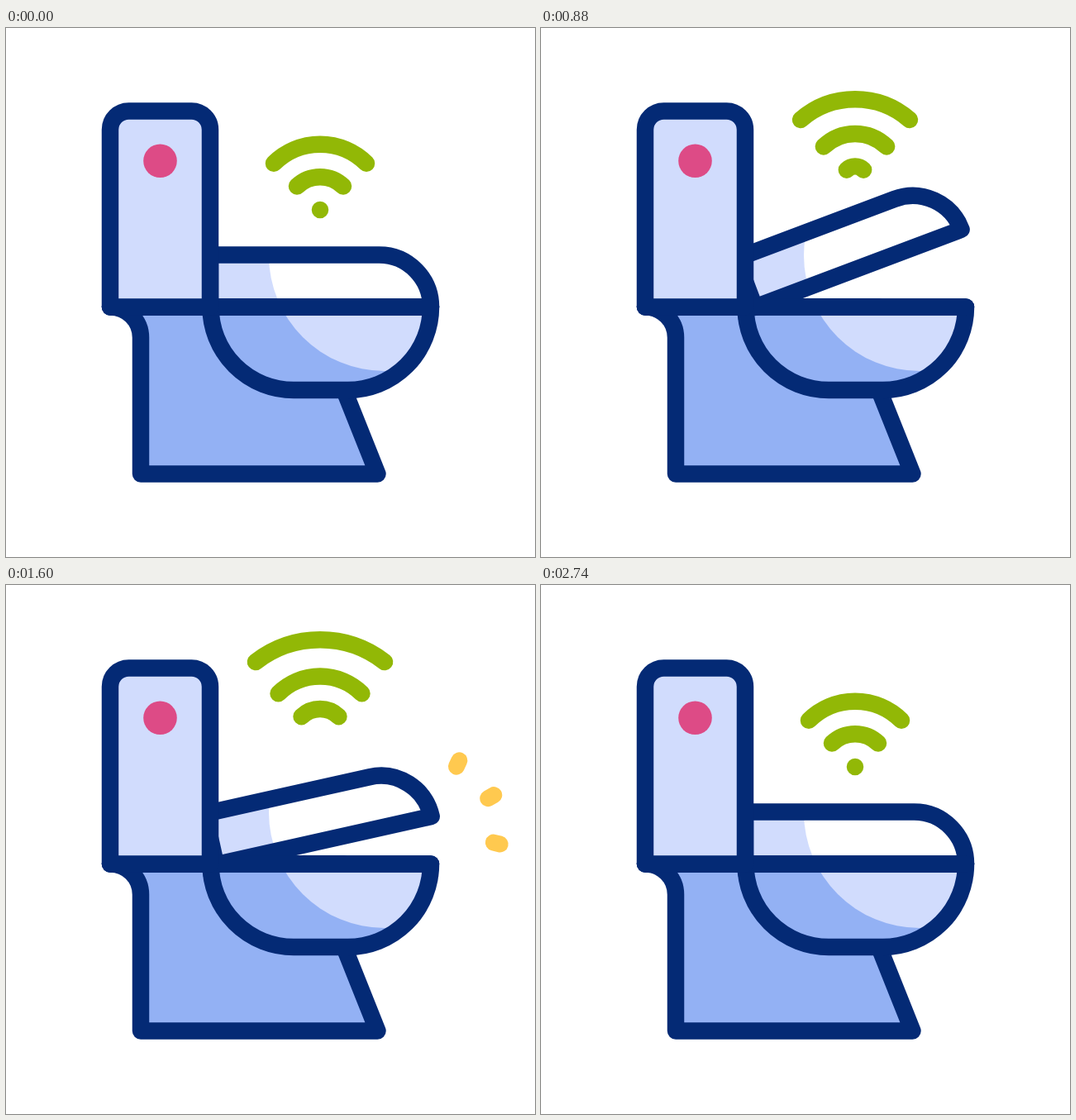
Recreate the animation shown at these times as an HTML page. Size 640x640 px, loop 3000 ms.

```html
<!DOCTYPE html>
<html>
<head>
<meta charset="utf-8">
<style>
html, body { margin: 0; width: 100%; height: 100%; overflow: hidden; background: #fff; }
svg { display: block; width: 100vw; height: 100vh; }
.line { stroke: #042a75; stroke-width: 20.5; stroke-linejoin: round; stroke-linecap: round; }
.wave { fill: none; stroke: #92b806; stroke-width: 20.5; stroke-linecap: round; }
.spark { stroke: #ffc94f; stroke-width: 20; stroke-linecap: round; }
</style>
</head>
<body>
<svg viewBox="0 0 640 640">
  <defs>
    <path id="bowl" d="M247.5 337.5a100.5 100.5 0 0 0 100.5 100.5H413.5A100.5 100.5 0 0 0 514 337.5Z"/>
    <path id="lid" d="M247 274.5H451.5A62.5 63 0 0 1 514 337.5H247Z"/>
    <clipPath id="inBowl"><use href="#bowl"/></clipPath>
    <clipPath id="inLid"><use href="#lid" class="turn"/></clipPath>
  </defs>
  <path class="line" fill="#93b1f4" d="M126 337.5A37 37 0 0 1 163 374.5V539.5H449.5L409 438V337.5Z"/>
  <use href="#bowl" fill="#93b1f4"/>
  <circle cx="458" cy="275" r="140" fill="#d1dcfd" clip-path="url(#inBowl)"/>
  <use href="#bowl" class="line" fill="none"/>
  <g id="sparks"></g>
  <g id="waves"></g>
  <use href="#lid" class="turn" fill="#d1dcfd"/>
  <circle cx="458" cy="275" r="140" fill="#fff" clip-path="url(#inLid)"/>
  <use href="#lid" class="line turn" fill="none"/>
  <path class="line" d="M126 337.5H514"/>
  <path class="line" fill="#d1dcfd" d="M126 337.5V123A22.5 22.5 0 0 1 148.5 100.5H224.5A22.5 22.5 0 0 1 247 123V337.5Z"/>
  <circle id="button" cx="186.5" cy="160.8" r="20.3" fill="#dd4b86"/>
</svg>
<script>
const LOOP = 3000;
const $ = s => document.querySelector(s);
const clamp = x => Math.min(1, Math.max(0, x));
const ramp = (t, start, length) => clamp((t - start) / length);
const ease = u => u * u * (3 - 2 * u);
const mix = (a, b, u) => a + (b - a) * u;

function add(parent, tag, cls) {
  const el = document.createElementNS("http://www.w3.org/2000/svg", tag);
  el.setAttribute("class", cls);
  return parent.appendChild(el);
}

// Wave stages: half width, end y, peak y
const stages = [[0, 220, 220], [28, 191.5, 180.2], [56, 163.7, 140.7], [83.5, 123, 95.3]];
const waves = [0, 1, 2].map(() => add($("#waves"), "path", "wave"));

// Sparks: x, y, direction
const sparks = [[546.5, 216.3, -65], [586.5, 256.3, -30], [593.5, 312.5, 14]].map(([x, y, a]) => {
  const el = add($("#sparks"), "line", "spark");
  el.setAttribute("transform", `translate(${x} ${y}) rotate(${a})`);
  return el;
});

const turning = document.querySelectorAll(".turn");
const GRAVITY = 1.48e-4;
const LIFT_END = 917;
const landings = [535, 1300, 1884, 2298, 2600, 2740];

// The lid lifts, then drops and bounces until it rests
function lidAngle(t) {
  const hop = (a, b, x) => GRAVITY * (x - a) * (b - x);
  if (t < LIFT_END) return hop(landings[0], landings[1], LIFT_END) * ease(ramp(t, 640, LIFT_END - 640));
  const i = landings.findIndex(x => x > t);
  return i < 0 ? 0 : hop(landings[i - 1], landings[i], t);
}

function drawWaves(t) {
  const cycles = t < 200 || t >= 2700 ? 0 : (t - 200) / 500;
  const f = cycles % 1;
  const rise = 38 * (ease(ramp(t, 200, 600)) - ease(ramp(t, 2000, 600)));
  waves.forEach((el, i) => {
    const [w, end, peak] = stages[i].map((v, k) => mix(v, stages[i + 1][k], f));
    const half = w + .01, sag = end - peak + .01;
    const r = (half * half + sag * sag) / (2 * sag);
    const y = end - rise;
    el.setAttribute("d", `M${380 - half} ${y}A${r} ${r} 0 0 1 ${380 + half} ${y}`);
  });
  waves[0].setAttribute("opacity", cycles < 1 ? 1 : ramp(f, .1, .1));
}

function drawSparks(t) {
  const reach = start => mix(-22, 6, ease(ramp(t, start, 400)));
  const head = reach(1260), tail = reach(1360);
  for (const el of sparks) {
    el.setAttribute("x1", tail);
    el.setAttribute("x2", head);
    el.setAttribute("visibility", head - tail > .05 ? "visible" : "hidden");
  }
}

function draw() {
  const t = performance.now() % LOOP;
  const angle = lidAngle(t);
  for (const el of turning) el.setAttribute("transform", `rotate(${-angle} 254 305.5)`);
  const press = ease(ramp(t, 200, 200)) - ease(ramp(t, 400, 200));
  $("#button").setAttribute("r", 20.3 * (1 - .25 * press));
  drawWaves(t);
  drawSparks(t);
  requestAnimationFrame(draw);
}
draw();
</script>
</body>
</html>
```
